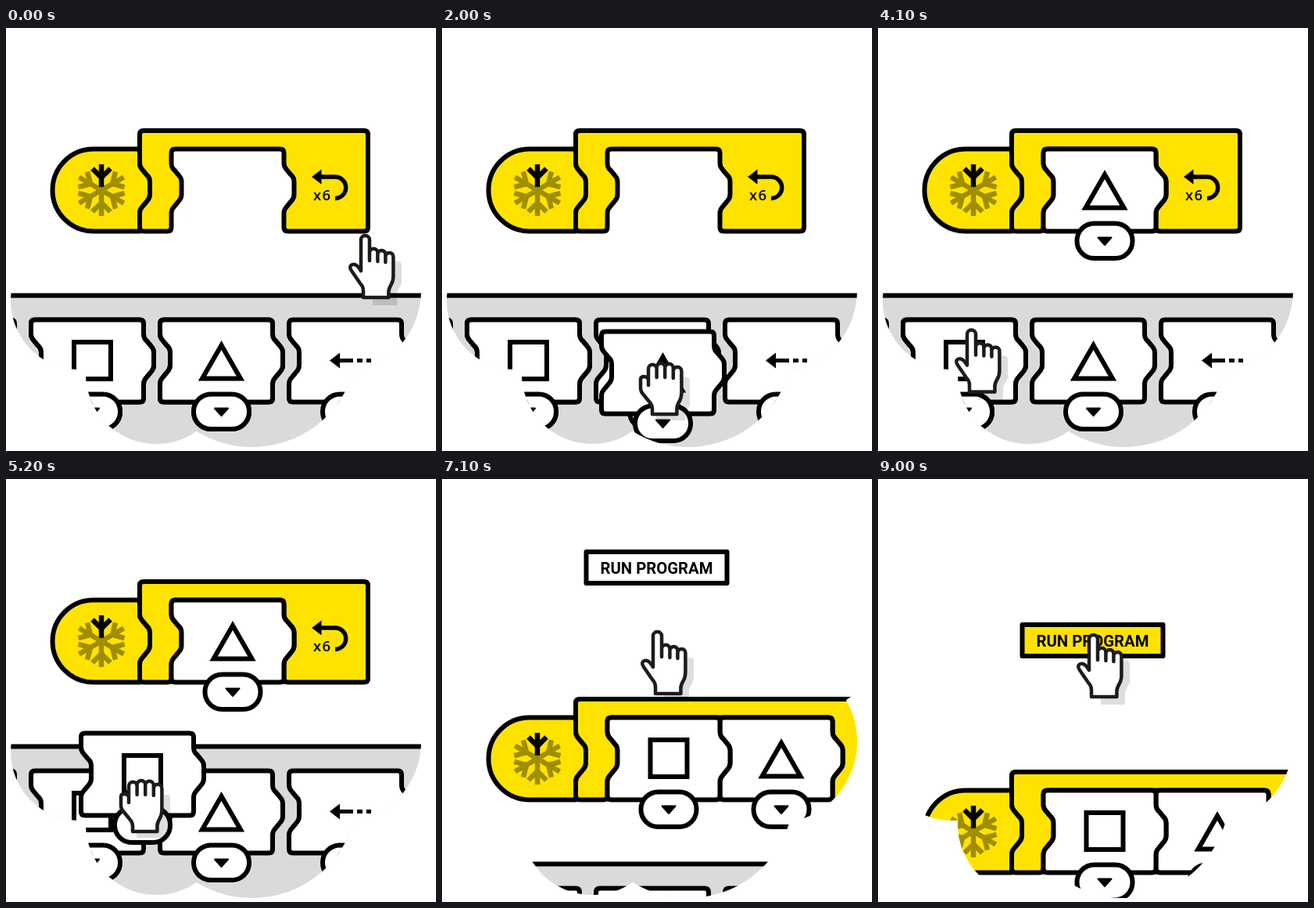
An HTML page that plays this animation: 550x540 px, repeating every 9500 ms.

```html
<!DOCTYPE html>
<html lang="en">
<head>
<meta charset="utf-8">
<title>Drag blocks and run</title>
<style>
  html, body { margin: 0; width: 100%; height: 100%; overflow: hidden; background: #fff; }
  svg { display: block; width: 550px; height: 540px; }
  .line { stroke: #000; stroke-width: 6; stroke-linejoin: round; }
  .icon { fill: none; stroke: #000; stroke-width: 6; }
  .yellow { fill: #ffe300; }
  .white { fill: #fff; }
  .hand { fill: #fff; stroke: #1c1c1c; stroke-width: 4.5; stroke-linejoin: round; }
  .shadow { fill: #000; opacity: .13; }
</style>
</head>
<body>
<svg viewBox="0 0 550 540">
  <defs>
    <clipPath id="blob">
      <circle cx="94" cy="348" r="88"/>
      <circle cx="192" cy="441" r="90"/>
      <circle cx="315" cy="400" r="135"/>
      <circle cx="426" cy="335" r="105"/>
      <circle cx="483" cy="228" r="64"/>
      <circle cx="300" cy="185" r="181"/>
      <circle cx="125" cy="210" r="85"/>
      <circle cx="215" cy="320" r="120"/>
    </clipPath>
    <g id="block">
      <path id="body" class="line white"/>
      <rect class="line white" x="43" y="95" width="71" height="44.500" rx="22"/>
      <path d="M70 113H87L78.500 122.500z" stroke="#000" stroke-width="2" stroke-linejoin="round"/>
    </g>
    <g id="square">
      <use href="#block"/>
      <rect class="icon" x="55" y="28.500" width="47" height="47"/>
    </g>
    <g id="triangle">
      <use href="#block"/>
      <path class="icon" d="M78.500 32.500L103 75H54z"/>
    </g>
    <g id="arrow">
      <use href="#block"/>
      <path d="M52 52L65 42V62z"/>
      <path class="icon" style="stroke-width:5" d="M64 52H82M87 52H94M99 52H105"/>
    </g>
    <path id="arm" fill="none" stroke-width="6.500" d="M0-4V-33M-11.500-27.500L0-16 11.500-27.500"/>
  </defs>

  <g clip-path="url(#blob)">
    <g id="scene">
      <path id="start" class="line yellow"/>
      <g id="flake" transform="translate(122 207)"></g>
      <path id="loop" class="line yellow"/>
      <g id="repeat">
        <path d="M391 190L403.500 180.500V199.500z"/>
        <path class="icon" style="stroke-width:5.500" d="M402 190H421a13.700 13.700 0 0 1 0 27.400"/>
        <text x="393" y="220" font-family="'Open Sans', 'Noto Sans', sans-serif" font-size="18.500" font-weight="600" letter-spacing="1.200">x6</text>
      </g>
      <rect x="-10" y="341.500" width="570" height="260" fill="#d9dbda"/>
      <path class="line" d="M-10 341.500H560"/>
      <use href="#block" x="-133" y="372.500"/>
      <use href="#square" x="32" y="372.500"/>
      <use href="#triangle" x="197" y="372.500"/>
      <use href="#arrow" x="362" y="372.500"/>
      <use href="#block" x="527" y="372.500"/>
      <use id="drag1" href="#triangle"/>
      <use id="drag2" href="#square"/>
      <g transform="translate(0 -243)">
        <rect id="run" class="line" x="184.500" y="186" width="180" height="40"/>
        <text x="274.500" y="214" text-anchor="middle" font-family="Roboto, sans-serif" font-size="20.300" font-weight="700">RUN PROGRAM</text>
      </g>
    </g>
  </g>

  <g id="hand">
    <g id="point">
      <path id="cast" class="shadow" d="M10 35H43q4 0 4 4V63l-6 12V91H10z"/>
      <path id="finger" class="hand" d="M-5 47V7.500a5.500 5.500 0 0 1 11 0V34V24a5.200 5.200 0 0 1 10.400 0V35V26a5 5 0 0 1 10 0V36V29a5 5 0 0 1 10 0V54q0 6-3 11t-3 9V81H-2V72q0-5-4-9L-17 47q-4-6 1-8 5-2 11 8z"/>
    </g>
    <g id="grab" transform="translate(-19 14)">
      <path class="shadow" d="M22 20H61q4 0 4 4V56l-6 10V75H22z"/>
      <path class="hand" d="M12 30V9a5.300 5.300 0 0 1 10.600 0V20V7.300a5.300 5.300 0 0 1 10.600 0V20V8a5.300 5.300 0 0 1 10.600 0V21V12a5.300 5.300 0 0 1 10.600 0V40q0 6-3 11t-3 9V67H17V60q0-5-4-9L4 40q-2-3-2-6V23q0-4 4-4 4 0 6 3z"/>
    </g>
  </g>
</svg>
<script>
const $ = id => document.getElementById(id);
const LOOP = 9500, STEP = 100;

// Jigsaw edge, drawn downwards or upwards
const down = 'q0 6 4 9l5 6q4 4 4 9v16q0 5-4 9l-5 6q-4 4-4 9';
const up = 'q0-5 4-9l5-6q4-4 4-9v-16q0-6-4-9l-5-6q-4-4-4-9';

$('body').setAttribute('d', `M5 0H139q5 0 5 5V18${down}V100q0 5-5 5H5q-5 0-5-5V82${up}V5q0-5 5-5z`);
$('start').setAttribute('d', `M171 154.500H112a52.500 52.500 0 0 0 0 105H171V236.500${up}z`);

const loopPath = gap =>
  `M176 131H${458 + gap}q5 0 5 5V254.500q0 5-5 5H${360.5 + gap}q-5 0-5-5V236.500${up}V159.500q0-5-5-5` +
  `H216.500q-5 0-5 5V172.500${down}V254.500q0 5-5 5H176q-5 0-5-5V236.500${up}V136q0-5 5-5z`;

$('flake').innerHTML = [60, 120, 180, 240, 300, 0].map(a =>
  `<use href="#arm" transform="rotate(${a})" stroke="${a ? '#9f8e00' : '#000'}"/>`).join('') +
  '<path d="M-3.500-2L3.500 2M-3.500 2L3.500-2M0-4V4" stroke="#9f8e00" stroke-width="6.500"/>';

// Keys are [time, ...values]; the curve rests at both ends
function track(keys, t) {
  const last = keys.length - 1;
  if (t <= keys[0][0]) return keys[0].slice(1);
  if (t >= keys[last][0]) return keys[last].slice(1);
  const i = keys.findIndex(k => k[0] > t) - 1;
  const a = keys[i], b = keys[i + 1], span = b[0] - a[0], s = (t - a[0]) / span;
  const slope = (n, c) => n === 0 || n === last ? 0 :
    (keys[n + 1][c] - keys[n - 1][c]) / (keys[n + 1][0] - keys[n - 1][0]) * span;
  const ease = s * s * (3 - 2 * s);
  return a.slice(1).map((v, j) => {
    const c = j + 1;
    return v + (b[c] - v) * ease
      + slope(i, c) * s * (1 - s) ** 2 - slope(i + 1, c) * s * s * (1 - s);
  });
}

const handTracks = [
  [[550, 459, 263], [1500, 275, 415]],
  [[1550, 275, 415], [2000, 271, 412], [2500, 314, 361], [2800, 326, 290], [3200, 280, 180], [3500, 260, 203]],
  [[3550, 260, 205], [4100, 119, 383.5], [4500, 115, 407]],
  [[4550, 115, 407], [5200, 164, 369], [5500, 237, 243], [5900, 275, 193]]
];
const triangleTrack = [[1550, 0, 0], [2000, 7, 15], [2500, 50, -36], [2800, 63, -110], [3200, 20, -231], [3500, 14.5, -218]];
const squareTrack = [[4550, 0, 0], [5200, 64, -48], [5500, 137, -174], [5900, 179.5, -218]];

const move = (id, x, y) => $(id).setAttribute('transform', `translate(${x} ${y})`);
const ramp = (t, from, to, size) => track([[from, 0], [to, size]], t)[0];
const show = (id, on) => $(id).setAttribute('visibility', on ? 'visible' : 'hidden');

function draw(t) {
  const gap = ramp(t, 5550, 5900, 144);
  const fade = ramp(t, 8050, 9000, 1);
  const [tx, ty] = track(triangleTrack, t);
  const [sx, sy] = track(squareTrack, t);
  const keys = handTracks.filter(k => k[0][0] <= t).pop() || handTracks[0];
  const grabbing = t >= 1600 && t < 3600 || t >= 4600 && t < 5900;

  move('scene', 0, ramp(t, 6550, 7500, 243));
  $('loop').setAttribute('d', loopPath(gap));
  move('repeat', gap, 0);
  move('drag1', 197 + tx + gap, 372.5 + ty);
  move('drag2', 32 + sx, 372.5 + sy);
  $('run').setAttribute('fill', `rgb(255 ${255 - 28 * fade} ${255 * (1 - fade)})`);

  move('hand', ...track(keys, t));
  move('finger', 0, ramp(t, 7550, 7900, 4));
  move('cast', 0, 4 * fade);
  show('point', !grabbing);
  show('grab', grabbing);
}

const start = performance.now();
function tick() {
  const t = (performance.now() - start) % LOOP;
  draw(Math.floor(t / STEP) * STEP);
  requestAnimationFrame(tick);
}
tick();
</script>
</body>
</html>
```
